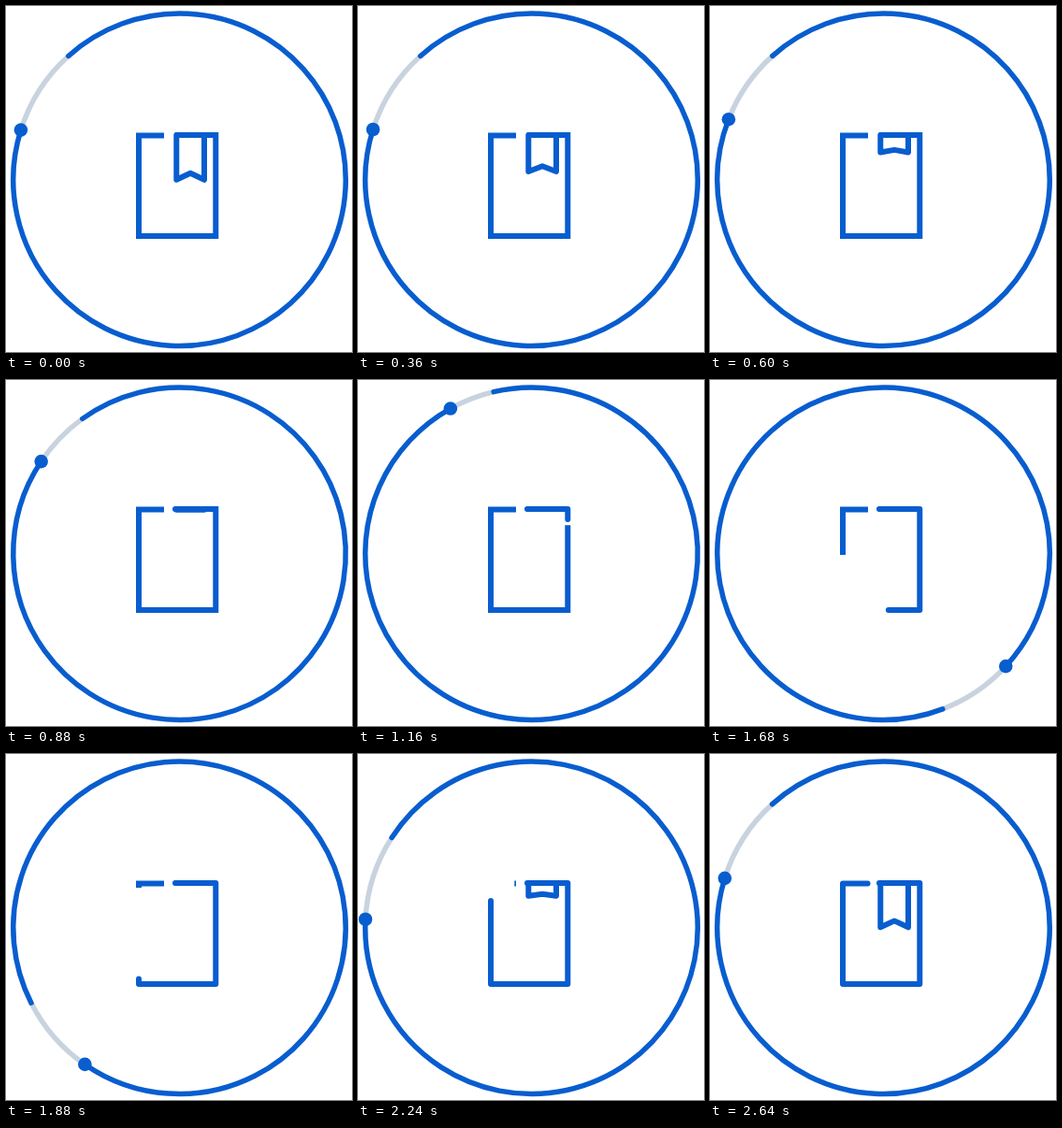
An HTML page with a canvas that plays this animation: 370 px wide and 370 px high, repeating every 2680 ms.

```html
<!DOCTYPE html>
<html lang="en">
<head>
<meta charset="utf-8">
<title>Book loader</title>
<style>
  html, body { margin: 0; width: 100%; height: 100%; overflow: hidden; background: #fff; }
  canvas { display: block; width: 370px; height: 370px; }
</style>
</head>
<body>
<canvas id="stage" width="370" height="370"></canvas>
<script>
const ctx = document.getElementById('stage').getContext('2d');
const LOOP = 2680, STEP = 40;
const BLUE = '#085dcf', GREY = '#c8d3df';
const CX = 185.5, CY = 185.75, R = 177.75;

// The outline runs clockwise from the bookmark to the gap in the top edge.
const OUTLINE = [[181, 138], [224.3, 138], [224.3, 246], [142, 246], [142, 138.5], [169, 138.5]];
const LENGTH = OUTLINE.slice(1).reduce(
  (sum, [x, y], i) => sum + Math.hypot(x - OUTLINE[i][0], y - OUTLINE[i][1]), 0);

const progress = (t, from, to) => Math.min(1, Math.max(0, (t - from) / (to - from)));
const smooth = x => x * x * (3 - 2 * x);

// Cubic Bezier easing with handles (x1, 0) and (x2, 1).
function ease(x, x1, x2) {
  if (x <= 0 || x >= 1) return x;
  let lo = 0, hi = 1;
  for (let i = 0; i < 24; i++) {
    const s = (lo + hi) / 2, r = 1 - s;
    if (3 * x1 * s * r * r + 3 * x2 * s * s * r + s * s * s < x) lo = s;
    else hi = s;
  }
  return smooth(hi);
}

function stroke(color, width, cap, join) {
  ctx.strokeStyle = color;
  ctx.lineWidth = width;
  ctx.lineCap = cap;
  ctx.lineJoin = join;
  ctx.stroke();
}

function polyline(points) {
  ctx.beginPath();
  points.forEach(([x, y]) => ctx.lineTo(x, y));
}

function arc(from, to, color, cap) {
  ctx.beginPath();
  ctx.arc(CX, CY, R, from, to);
  stroke(color, 5.5, cap, 'round');
}

// The dot chases the open end of the ring through one full turn.
function drawRing(t) {
  const rad = deg => (deg - 90) * Math.PI / 180;
  const dot = rad(360 * ease(progress(t, 285, LOOP), .785, .38) - 72.6);
  const end = rad(360 * ease(progress(t, 575, LOOP), .7, .318) - 41.9);
  arc(dot, end, GREY, 'butt');
  arc(end, dot + 2 * Math.PI, BLUE, 'round');
  ctx.beginPath();
  ctx.arc(CX + R * Math.cos(dot), CY + R * Math.sin(dot), 7.3, 0, 2 * Math.PI);
  ctx.fillStyle = BLUE;
  ctx.fill();
}

// A sharp outline is erased from its start while a rounded one follows it.
function drawBook(t) {
  const erased = LENGTH * ease(progress(t, 680, 2370), .515, .325);
  const drawn = LENGTH * smooth(progress(t, 675, LOOP));
  polyline(OUTLINE);
  if (erased < LENGTH) {
    ctx.setLineDash([LENGTH + 2, LENGTH + 2]);
    ctx.lineDashOffset = -erased;
    stroke(BLUE, 6, 'butt', 'miter');
  }
  if (drawn > 0) {
    ctx.setLineDash([drawn, 2 * LENGTH]);
    ctx.lineDashOffset = 0;
    stroke(BLUE, 6, 'round', 'round');
  }
  ctx.setLineDash([]);
}

function drawBookmark(t) {
  const size = 1 - smooth(progress(t, 140, 940)) + smooth(progress(t, 2000, LOOP));
  const left = 182.3, right = 212, top = 138;
  const low = top + 47.8 * size, notch = top + 40.8 * size;
  polyline([[left, top], [left, low], [(left + right) / 2, notch], [right, low], [right, top]]);
  stroke(BLUE, 6, 'round', 'round');
}

function frame(now) {
  const t = Math.floor(now % LOOP / STEP) * STEP;
  ctx.clearRect(0, 0, 370, 370);
  drawRing(t);
  drawBook(t);
  drawBookmark(t);
  requestAnimationFrame(() => frame(performance.now() - start));
}

const start = performance.now();
frame(0);
</script>
</body>
</html>
```
